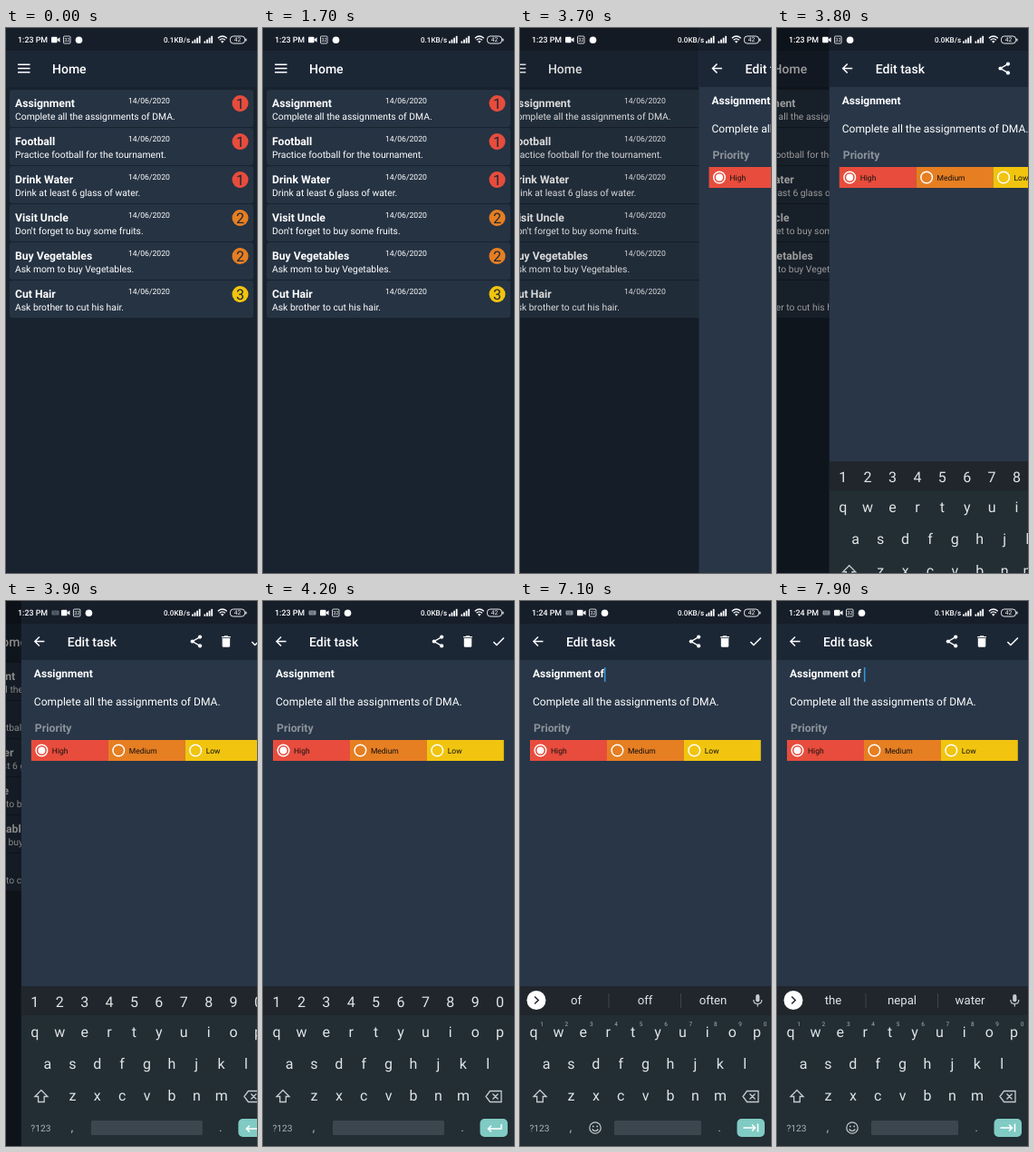
These frames come from a looping animation (277x600 px, 8 s). An HTML page:

```html
<!DOCTYPE html>
<html lang="en">
<head>
<meta charset="utf-8">
<title>Task list</title>
<style>
  html, body { margin: 0; width: 100%; height: 100%; overflow: hidden; background: #18232f; }
  svg { display: block; width: 100%; height: 100%; }
  text { font-family: Roboto, sans-serif; fill: #fff; white-space: pre; text-rendering: geometricPrecision; }
</style>
</head>
<body>
<svg id="stage" viewBox="0 0 277 600"></svg>
<script>
const LOOP = 8000;
const stage = document.getElementById('stage');
const $ = id => document.getElementById(id);

const text = (x, y, size, content, attrs = '') =>
  `<text x="${x}" y="${y}" font-size="${size}" ${attrs}>${content}</text>`;
const centered = (x, y, size, content, attrs = '') =>
  text(x, y, size, content, `text-anchor="middle" ${attrs}`);
const rect = (x, y, w, h, fill, rx = 0, attrs = '') =>
  `<rect x="${x}" y="${y}" width="${w}" height="${h}" fill="${fill}" rx="${rx}" ${attrs}/>`;
const circle = (x, y, r, fill, attrs = '') =>
  `<circle cx="${x}" cy="${y}" r="${r}" fill="${fill}" ${attrs}/>`;
const line = (d, width = 1.5, color = '#fff', attrs = '') =>
  `<path d="${d}" fill="none" stroke="${color}" stroke-width="${width}" ${attrs}/>`;
const shape = (d, fill = '#fff') => `<path d="${d}" fill="${fill}"/>`;
const group = (id, content) => `<g id="${id}">${content}</g>`;

const HEADER = '#1c2736';
const KEY_ICON = '#c6ccd0';
const PRIORITY = ['#e74c3c', '#e67e22', '#f1c40f'];
const TASKS = [
  ['Assignment', 'Complete all the assignments of DMA.', 1],
  ['Football', 'Practice football for the tournament.', 1],
  ['Drink Water', 'Drink at least 6 glass of water.', 1],
  ['Visit Uncle', "Don't forget to buy some fruits.", 2],
  ['Buy Vegetables', 'Ask mom to buy Vegetables.', 2],
  ['Cut Hair', 'Ask brother to cut his hair.', 3],
];

function homePage() {
  const rows = TASKS.map(([title, note, level], i) => `<g transform="translate(0 ${68 + i * 42})">` +
    rect(4, 0, 269, 41, '#263343', 3) +
    text(10, 19, 12.2, title, 'font-weight="700"') +
    text(135, 14.6, 8.65, '14/06/2020') +
    text(10, 33.4, 10.35, note) +
    circle(258.5, 15, 9, PRIORITY[level - 1]) +
    centered(258.5, 20.7, 16, level, 'style="fill:#1c2736"') + '</g>');
  return rect(0, 0, 277, 600, '#18232f') + rect(0, 0, 277, 65, HEADER) +
    line('M13 40.3h13.5M13 44.5h13.5M13 48.7h13.5') +
    text(51, 50, 14, 'Home', 'font-weight="500"') + rows.join('');
}

function editPage() {
  const options = ['High', 'Medium', 'Low'].map((label, i) => {
    const x = 11 + i * 84.9;
    return rect(x, 153, 85, 23, PRIORITY[i]) +
      circle(x + 11.5, 164.5, 6.3, 'none', 'stroke="#fff" stroke-width="1.5"') +
      (i ? '' : circle(x + 11.5, 164.5, 4, '#fff')) +
      text(x + 23, 167.6, 8.5, label, 'style="fill:#111"');
  });
  return rect(0, 0, 277, 600, '#283647') + rect(0, 0, 277, 65, HEADER) +
    line('M25.5 44.5H15.5M20 39.5l-5 5 5 5') +
    text(51, 50, 14, 'Edit task', 'font-weight="500"') +
    line('M197.2 39.6l-8.4 4.9 8.4 4.9', 1.4) +
    circle(197.2, 39.6, 2.1, '#fff') + circle(188.8, 44.5, 2.1, '#fff') + circle(197.2, 49.4, 2.1, '#fff') +
    shape('M221.8 41h8.5v8.4q0 1.4-1.4 1.4h-5.7q-1.4 0-1.4-1.4zM221.1 38.9h2.5l.7-.7h3.5l.7.7h2.5v1.4h-9.9z') +
    line('M254.4 45l3.5 3.5 8-8', 1.5) +
    text(14, 84, 12, '', 'id="title" font-weight="700"') +
    rect(14, 86, 65, 1, '#fff', 0, 'id="underline"') +
    rect(0, 73, 1.5, 16, '#3498db', 0, 'id="caret"') +
    text(14, 115, 12.05, 'Complete all the assignments of DMA.') +
    text(15, 144.3, 12.25, 'Priority', 'font-weight="700" style="fill:#8d939b"') +
    options.join('') + group('keyboard', keyboard());
}

function keyboard() {
  const keys = (letters, first, y) => [...letters].map((c, i) =>
    centered(first + i * 27.4, y, 16, c, 'style="fill:#e0e4e6"')).join('');
  const gray = 'style="fill:#aab2b7"';
  const hints = [...'1234567890'].map((c, i) => centered(24 + i * 27.4, 467.5, 6.5, c, gray));
  const suggestions = [62, 138, 213].map((x, i) =>
    centered(x, 444, 13.2, '', `id="word${i}" style="fill:#e0e4e6"`));

  return rect(0, 424, 277, 176, '#222d34') + rect(0, 424, 277, 32, '#20262c') +
    keys('qwertyuiop', 15, 479.5) + keys('asdfghjkl', 29, 514.5) + keys('zxcvbnm', 56.5, 549.5) +
    line('M22 538.5l-7 7h3.7v6h6.6v-6h3.7z', 1.3, KEY_ICON) +
    line('M250.5 539.5h12.5v12h-12.5l-4.5-6zM253.5 542.5l6 6M259.5 542.5l-6 6', 1.3, KEY_ICON) +
    text(10.5, 584, 10.2, '?123', gray) + centered(56, 584, 14, ',', gray) + centered(220, 584, 14, '.', gray) +
    rect(239.5, 570, 30.5, 20, '#80cbc4', 5) +
    group('digitMode', keys('1234567890', 15, 446.7) + rect(77, 572, 123, 16, '#3c464e', 1.5) +
      line('M263 576v5h-14.5M252 577.5l-3.5 3.5 3.5 3.5')) +
    group('wordMode', hints.join('') + suggestions.join('') +
      circle(18, 439.5, 10.5, '#fff') + line('M16.2 435.5l4 4-4 4', 1.5, '#20262c') +
      rect(97.5, 432, 1, 16, '#3c464e') + rect(177, 432, 1, 16, '#3c464e') +
      rect(260.2, 433, 4.2, 8.4, KEY_ICON, 2.1) +
      line('M257.8 439q0 4.6 4.5 4.6t4.5-4.6M262.3 443.6v3', 1.2, KEY_ICON) +
      circle(83, 580, 6.2, 'none', `stroke="${KEY_ICON}" stroke-width="1.2"`) +
      circle(80.8, 578.4, .9, KEY_ICON) + circle(85.2, 578.4, .9, KEY_ICON) +
      line('M79.6 581.5q3.4 4 6.8 0', 1.2, KEY_ICON) +
      rect(104, 572, 96, 16, '#3c464e', 1.5) +
      line('M246.5 580h13M256 576.5l3.5 3.5-3.5 3.5M262.5 575.5v9'));
}

function statusBar() {
  const signal = x => [0, 1, 2, 3].map(i => rect(x + i * 2.6, 14.5 - i * 1.9, 1.8, 2.2 + i * 1.9, '#fff')).join('');
  return rect(0, 0, 277, 25, '#000', 0, 'opacity=".22"') +
    text(13, 16.3, 8.9, '', 'id="clock" font-weight="500"') +
    group('imeIcon', rect(50.5, 10.5, 8, 5, '#8c959e', 1) +
      line('M52 12.2h5M52.5 14h4', .7, HEADER, 'stroke-dasharray="1 .6"')) +
    group('notices', rect(50, 9.8, 6.5, 6.5, '#fff', 1) + shape('M56 13l3.5-2.8v5.6z') +
      rect(63.5, 9, 7.5, 8, 'none', 1, 'stroke="#fff" stroke-width=".8"') + centered(67.3, 15.2, 5.5, '32') +
      circle(80.5, 13.2, 3.8, '#fff')) +
    text(174, 16, 8.1, '', 'id="speed" font-weight="500"') + signal(205) + signal(218.5) +
    line('M233.8 11.3q5-4.6 10 0M235.6 13.3q3.2-2.8 6.4 0', 1.2) +
    shape('M237 14.6q1.8-1.4 3.6 0l-1.8 2.2z') +
    rect(247.5, 9, 16, 8, 'none', 3.2, 'stroke="#fff" stroke-width=".9"') +
    rect(264.3, 11.6, 1.2, 3, '#fff', .5) + centered(255.5, 15.4, 6.6, '42');
}

stage.innerHTML = group('home', homePage()) + rect(0, 0, 277, 600, '#000', 0, 'id="shade"') +
  group('edit', editPage()) + statusBar();

// Each step: start time, title, suggested words.
const TYPING = [
  [0, 'Assignment', ['', '', '']],
  [6400, 'Assignment ', ['of', 'for', 'and']],
  [6900, 'Assignment o', ['of', 'on', 'or']],
  [7100, 'Assignment of', ['of', 'off', 'often']],
  [7400, 'Assignment of ', ['the', 'nepal', 'water']],
];

const progress = (t, start, length) => Math.min(1, Math.max(0, (t - start) / length));
const move = (id, x, y) => $(id).setAttribute('transform', `translate(${x} ${y})`);
const show = (id, visible) => $(id).setAttribute('visibility', visible ? 'visible' : 'hidden');
const setText = (id, value) => { if ($(id).textContent !== value) $(id).textContent = value; };

function render(t) {
  // The edit page decays into place while the home page follows by a quarter.
  let x = t < 3673.5 ? 277 : 277 * Math.exp(-0.0123 * (t - 3673.5));
  if (x < 0.5) x = 0;
  const opened = 1 - x / 277;
  move('edit', x, 0);
  move('home', -70 * opened, 0);
  $('shade').setAttribute('opacity', 0.5 * opened);
  move('keyboard', 0, 176 * (1 - progress(t, 3720, 180)) ** 2);

  const shift = progress(t, 3800, 120);
  move('notices', 13 * shift, 0);
  $('imeIcon').setAttribute('opacity', shift ** 3);
  setText('clock', t < 5600 ? '1:23 PM' : '1:24 PM');
  setText('speed', t < 3400 || t >= 7400 ? '0.1KB/s' : '0.0KB/s');

  const [, title, words] = TYPING.findLast(([start]) => t >= start);
  setText('title', title);
  words.forEach((word, i) => setText('word' + i, word));
  show('digitMode', t < 6400);
  show('wordMode', t >= 6400);
  show('underline', t >= 6100 && t < 6400);
  show('caret', t >= 6100);
  $('caret').setAttribute('x', 14 + $('title').getComputedTextLength());
}

function tick() {
  render(performance.now() % LOOP);
  requestAnimationFrame(tick);
}
tick();
</script>
</body>
</html>
```
